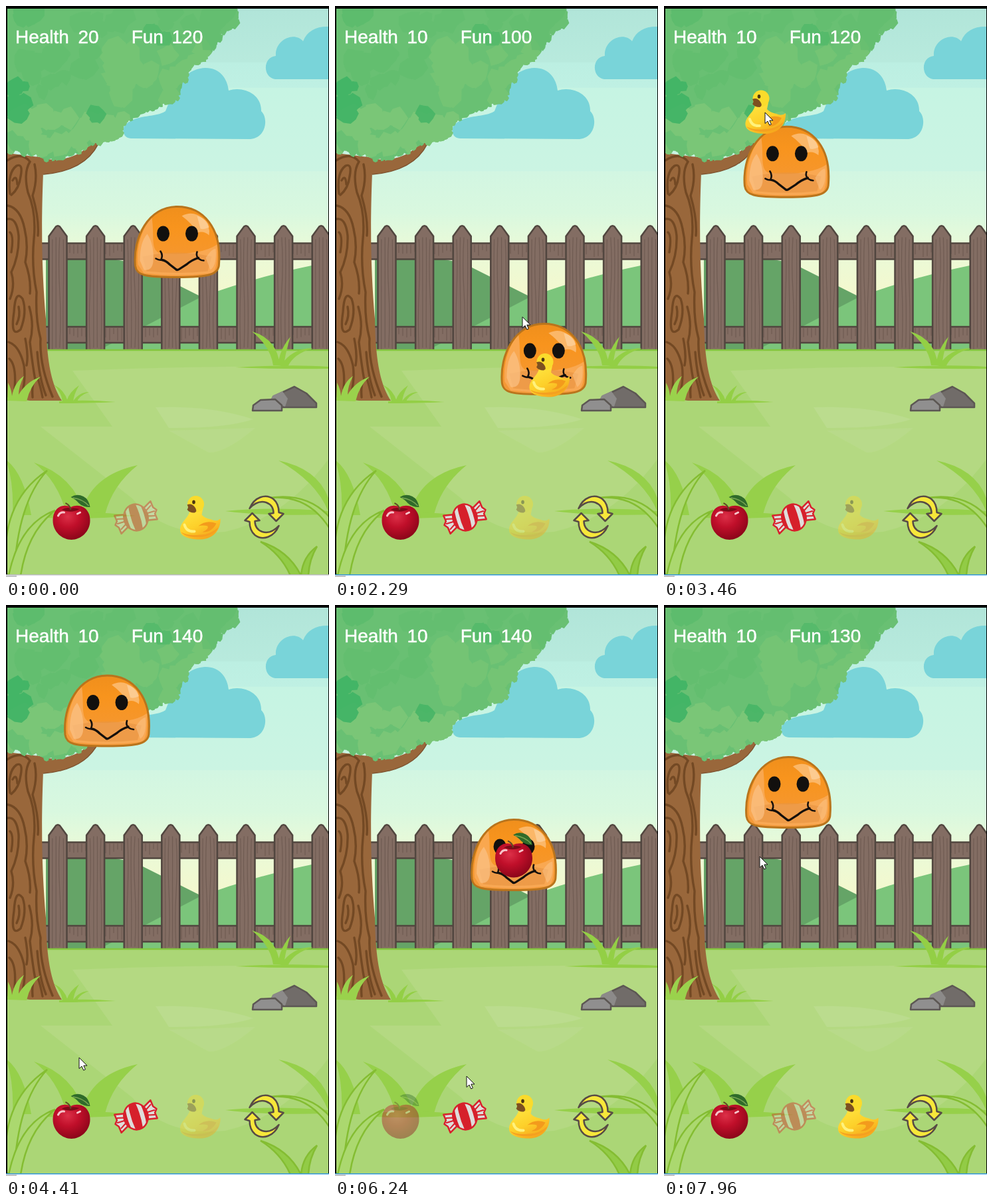
Animation of 486 by 858 pixels, one loop 8 s. Source, as an HTML page:

```html
<!DOCTYPE html>
<html lang="en">
<head>
<meta charset="utf-8">
<title>Garden pet</title>
<style>
  html, body { margin: 0; width: 100%; height: 100%; overflow: hidden; background: #000; }
  svg { display: block; width: 486px; height: 858px; }
  text { font: 28px "Liberation Sans", Arial, sans-serif; fill: #fff; stroke: #fff; stroke-width: .5px; }
</style>
</head>
<body>
<svg viewBox="0 0 486 858" xmlns="http://www.w3.org/2000/svg">
  <defs>
    <linearGradient id="sky" gradientUnits="userSpaceOnUse" x1="0" y1="4" x2="0" y2="516">
      <stop offset="0" stop-color="#b1e5d9"/>
      <stop offset=".155" stop-color="#b8eadd"/>
      <stop offset=".16" stop-color="#bcefe2"/>
      <stop offset=".231" stop-color="#bff0e3"/>
      <stop offset=".233" stop-color="#c6f4e3"/>
      <stop offset=".476" stop-color="#cbf4e3"/>
      <stop offset=".478" stop-color="#d2f6e2"/>
      <stop offset=".6" stop-color="#d9f8df"/>
      <stop offset=".69" stop-color="#e8fad9"/>
      <stop offset=".85" stop-color="#f5f8cd"/>
    </linearGradient>
    <linearGradient id="skin" x1="0" y1="0" x2="0" y2="1">
      <stop offset="0" stop-color="#f08f1c"/>
      <stop offset=".3" stop-color="#f8941d"/>
      <stop offset=".62" stop-color="#f6962a"/>
      <stop offset="1" stop-color="#f39a3c"/>
    </linearGradient>
    <radialGradient id="red" cx=".4" cy=".32" r=".7">
      <stop offset="0" stop-color="#dc3048"/>
      <stop offset=".45" stop-color="#c00f2a"/>
      <stop offset="1" stop-color="#8a0519"/>
    </radialGradient>
    <linearGradient id="yolk" x1="0" y1="0" x2=".6" y2="1">
      <stop offset="0" stop-color="#ffea45"/>
      <stop offset=".6" stop-color="#fdd02a"/>
      <stop offset="1" stop-color="#f6a71d"/>
    </linearGradient>
    <clipPath id="stage"><rect x="2" y="4" width="483" height="850"/></clipPath>
    <clipPath id="crown"><path id="crownClip"/></clipPath>
    <clipPath id="ball"><ellipse rx="18" ry="20"/></clipPath>

    <g id="apple">
      <path d="M-1-15C-11-21-28-16-28 5C-28 22-14 34 0 34C14 34 28 22 28 5C28-16 10-21-1-15Z" fill="url(#red)"/>
      <path d="M-15-11Q0-5 12-12Q3-15-1-13Q-7-16-15-11Z" fill="#7c0a18"/>
      <path d="M-1-11Q-2-18-9-21" fill="none" stroke="#5f4a26" stroke-width="2"/>
      <path d="M-1-30Q8-36 18-31Q26-27 28-15Q17-15 11-21Q6-27-1-30Z" fill="#2f6b2a"/>
      <path d="M2-29Q17-27 26-17" fill="none" stroke="#79a653" stroke-width="1.500"/>
      <path d="M-20-2Q-17-8-11-7M9-5L13-7" fill="none" stroke="#f6c3c9" stroke-width="3" stroke-linecap="round"/>
    </g>
    <g id="candy" transform="rotate(-17)" stroke="#d8202c" stroke-linejoin="round">
      <path d="M-15-9L-30-12L-29-3L-33 2L-29 7L-28 17L-15 10ZM15-10L28-17L29-7L33-2L29 3L30 12L15 9Z" fill="#dedcda" stroke-width="2.500"/>
      <path d="M-17-3L-28-6M-17 1H-30M-17 5L-27 11M17-5L27-11M17-1H30M17 3L28 6" stroke-width="2"/>
      <ellipse rx="18" ry="20" fill="#dfdddb" stroke="none"/>
      <g clip-path="url(#ball)" fill="#d6202b" stroke="none">
        <path d="M-20-20H-11Q-15 0-11 20H-20ZM-6-20H5Q8 0 5 20H-6Q-9 0-6-20ZM11-20H20V20H11Q15 0 11-20Z"/>
      </g>
      <ellipse rx="18" ry="20" fill="none" stroke-width="2.500"/>
    </g>
    <g id="duck">
      <path d="M-15-10C-16-1-26 5-29 14C-33 29-16 33 2 33C22 32 32 17 31 2Q25 7 17 3Q7 1 3-4L5-14Z" fill="url(#yolk)"/>
      <path d="M-28 22C-20 33 20 34 28 15Q14 27 0 26Q-18 28-28 22Z" fill="#f5a020"/>
      <path d="M-2 13Q10 3 25 9Q18 23 4 22Q14 18 12 13Q5 11-2 13Z" fill="#f39b1c"/>
      <path d="M-23 11Q-20 22-8 21" fill="none" stroke="#fff27c" stroke-width="4" stroke-linecap="round"/>
      <circle cx="-6" cy="-20" r="12.500" fill="#fadb2c"/>
      <path d="M-19-19Q-12-22-7-15Q-3-9-8-7Q-16-7-19-12Q-16-15-19-19Z" fill="#7d5020"/>
      <ellipse cx="-9" cy="-23" rx="2.300" ry="3" fill="#4a3512"/>
    </g>
    <path id="arrow" d="M-22-13C-15-30 2-36 14-27Q22-20 22-7L29-5L18 6L7-5L14-6Q14-18 3-22Q-10-26-22-13Z" fill="#f7e73a" stroke="#574b45" stroke-width="2.500" stroke-linejoin="round"/>
    <path id="dome" d="M-63 36C-67-7-43-53 0-53C40-53 67-20 63 33C63 49 48 53 0 53C-50 53-61 50-63 36Z"/>
  </defs>

  <rect width="486" height="858"/>
  <g clip-path="url(#stage)">
    <rect y="4" width="486" height="513" fill="url(#sky)"/>
    <g fill="#79d4d9">
      <path d="M188 199C174 198 174 182 181 177C200 162 225 168 240 158C252 128 266 94 300 93C322 93 333 109 335 127C355 120 385 131 384 158C395 168 392 198 368 200Z"/>
      <path d="M405 110C386 107 386 77 406 75C404 52 433 37 447 53C453 37 468 30 486 31V110Z"/>
    </g>
    <path d="M60 381H165Q190 385 206 393L294 437L240 517H60Z" fill="#65a467"/>
    <path d="M140 517L294 437Q390 402 486 385V517Z" fill="#7bc57b"/>
    <g id="fence" fill="#836d63" stroke="#51463f" stroke-width="2.500"></g>

    <rect y="516" width="486" height="340" fill="#abd676"/>
    <path d="M100 548Q300 540 486 542V680Q420 770 330 790Q240 800 190 740L52 632H160Z" fill="#b4d982"/>
    <path d="M225 603Q310 600 372 621Q330 635 245 634Z" fill="#bbdc8e"/>
    <path d="M245 638L375 634Q330 672 305 671Z" fill="#bbdc8e" opacity=".7"/>
    <path d="M2 517H486" stroke="#84c63f" stroke-width="2.500"/>

    <g fill="#93cf45">
      <path d="M345 543Q430 538 486 542V545Q410 546 345 543Z"/>
      <path d="M370 489Q408 500 412 540H402Q398 512 370 489ZM409 540Q412 515 428 497Q420 522 418 541ZM413 541Q430 514 462 514Q432 523 424 542Z"/>
      <path d="M80 594Q120 591 165 595Q120 597 80 597ZM72 569Q88 577 93 594H85Q83 580 72 569ZM91 594Q95 580 110 570Q102 583 101 595ZM100 595Q110 580 125 580Q110 585 106 596Z"/>
    </g>

    <path d="M2 221L57 228C52 330 54 400 60 470C61 530 67 567 84 593H36L2 588Z" fill="#99673b"/>
    <path d="M46 226C80 238 112 226 131 204L139 207C124 237 94 250 55 253Z" fill="#99673b"/>
    <path d="M56 253C94 250 124 237 139 207" fill="none" stroke="#7e5330" stroke-width="1.500"/>
    <g fill="none" stroke="#734924" stroke-width="3.400" stroke-linecap="round">
      <path d="M2 232Q24 218 36 234Q26 250 33 280Q46 310 42 350Q38 390 46 430Q44 470 52 500Q50 540 70 587"/>
      <path d="M6 282Q2 250 16 240Q26 236 22 256Q20 274 8 284M10 262Q16 252 17 268"/>
      <path d="M43 238Q48 260 40 285Q50 320 48 345M3 300Q22 304 28 335Q34 360 29 385Q38 410 36 432"/>
      <path d="M3 320Q16 318 19 345Q20 375 8 400Q14 420 6 440M6 340Q12 345 8 370"/>
      <path d="M25 440Q32 460 22 486Q6 500 12 460Q14 425 25 440ZM19 452Q22 466 16 478"/>
      <path d="M35 452Q43 480 36 505Q40 540 44 562M4 505Q20 510 27 540Q30 560 24 584M5 530Q16 540 13 575M29 500Q34 525 31 540"/>
      <path d="M47 520Q50 560 60 585M40 588Q38 560 48 560Q52 572 55 588"/>
    </g>
    <path fill="#9ad24c" d="M2 593L3 566Q8 575 9 586Q13 565 27 556Q19 572 19 584Q30 565 52 557Q36 571 31 594Z"/>
    <g id="tree"></g>

    <g stroke="#5c5753" stroke-width="2.500" stroke-linejoin="round">
      <path d="M397 603L402 587L434 572L452 582L467 597V603Z" fill="#716c69"/>
      <path d="M396 594L402 585L416 579L424 590L420 602Z" fill="#8c8a89" stroke="none"/>
      <path d="M371 608L372 600L383 592L405 591L415 600V608Z" fill="#908f8f"/>
    </g>

    <g fill="#96d04a">
      <path d="M0 682Q27 702 38 765H10Q12 715 0 682ZM42 686Q104 706 120 768H92Q80 715 42 686ZM112 766Q126 705 198 690Q158 722 148 768Z"/>
      <path d="M95 733Q110 748 108 770H97Q104 750 95 733ZM60 764Q110 756 195 766Q120 772 60 769Z"/>
      <path d="M410 683Q470 695 486 742V762Q468 715 410 683ZM330 759Q395 752 486 759V764Q390 767 330 759Z"/>
    </g>
    <g fill="#abd86f" stroke="#84bd32" stroke-width="2.500">
      <path d="M0 806Q6 735 62 698Q18 745 12 854H0Z"/>
      <path d="M4 856Q20 777 74 758Q32 790 22 856Z"/>
      <path d="M390 740Q455 730 490 790V772Q455 728 390 740Z"/>
      <path d="M428 856Q414 824 383 805Q425 818 444 856Z" fill="#92cb46"/>
      <path d="M444 856Q446 828 468 812Q456 832 455 856Z" fill="#92cb46"/>
    </g>

    <use id="barApple" href="#apple" x="98.500" y="768"/>
    <use id="barCandy" href="#candy" x="195.500" y="768.500"/>
    <use id="barDuck" href="#duck" x="291.500" y="768.500"/>
    <g transform="translate(388.500 768)">
      <use href="#arrow"/>
      <use href="#arrow" transform="rotate(180)"/>
    </g>

    <g id="pet">
      <use href="#dome" fill="url(#skin)"/>
      <path d="M-59 34C-62 4-50-26-38-36C-34-10-40 10-28 16Q0 21 30 15Q48 12 60 4Q62 46 50 47Q0 53-50 47Z" fill="#faad5c" opacity=".8"/>
      <path d="M-52 22Q0 10 52 22L46 44Q0 49-46 44Z" fill="#e99543" opacity=".65"/>
      <path d="M-56 28Q-56 0-45-12Q-34 5-36 30Q-38 44-50 42Z" fill="#fbc286" opacity=".7"/>
      <path d="M7-39Q24-48 39-35Q51-22 48-10Q40-17 31-14Q22-28 7-39Z" fill="#fbb768"/>
      <path d="M30-39Q45-35 48-22Q40-18 35-20Z" fill="#fcd09a" opacity=".8"/>
      <path d="M43 24Q52 10 58 10Q60 36 50 42Z" fill="#fbc286" opacity=".55"/>
      <use href="#dome" fill="none" stroke="#b9741c" stroke-width="3"/>
      <ellipse cx="-21" cy="-12.500" rx="9.500" ry="11.500" fill="#12100e"/>
      <ellipse cx="22" cy="-12.500" rx="9.500" ry="11.500" fill="#12100e"/>
      <path id="mouth" fill="#1a0e08"/>
      <path id="smile" fill="none" stroke="#15100c" stroke-width="3.300" stroke-linecap="round"/>
      <path d="M-32 25Q-27 28-23 27M-25 14Q-21 20-24 26M30 15Q28 21 32 25Q36 28 40 28" fill="none" stroke="#15100c" stroke-width="2.600" stroke-linecap="round"/>
    </g>
    <use id="item"/>
    <g>
      <text x="14" y="56">Health</text>
      <text x="108.500" y="56" id="health">20</text>
      <text x="188.700" y="56">Fun</text>
      <text x="249.500" y="56" id="fun">120</text>
    </g>
  </g>

  <rect y="854" width="486" height="4" fill="#fff"/>
  <rect id="edge" y="854" width="486" height="1.500"/>
  <rect y="855.500" width="16" height="2.500" fill="#c3c5c8"/>
  <path id="cursor" d="M0 0V16.500L4 13L6.700 19L9.400 17.800L6.800 12H12Z" fill="#fff" stroke="#111" stroke-width="1" stroke-linejoin="round"/>
</svg>

<script>
const $ = id => document.getElementById(id);
let seed = 11;
const rnd = () => (seed = seed * 16807 % 2147483647) / 2147483647;
const mix = (a, b, k) => a + (b - a) * k;

// Fence: two rails behind eight pointed posts, all with upright grain
const grain = d => `<path d="${d}" fill="none" stroke="#705c53" stroke-width="1.200"/>`;
let fence = '';
for (const y of [356.5, 482]) {
  fence += `<rect x="40" y="${y}" width="460" height="24"/>`;
  for (let x = 66; x < 486; x += 6) fence += grain(`M${x} ${y + 2}v${8 + rnd() * 11}`);
}
for (let i = 0; i < 8; i++) {
  const x = 78 + 56.6 * i;
  fence += `<path d="M${x - 13.5} 519V346L${x - 3} 331.500Q${x} 329 ${x + 3} 331.500L${x + 13.5} 346V519Z"/>`;
  for (let k = -1.5; k <= 1.5; k++) {
    fence += grain(`M${x + k * 5.5} ${346 + Math.abs(k) * 3}q${rnd() * 6 - 3} 40 0 80t0 86`);
  }
}
$('fence').innerHTML = fence;

// Tree crown: ragged edge plus painted patches
const rim = [[0, 2], [345, 2], [346, 22], [326, 40], [314, 54], [302, 72], [288, 84], [272, 90], [272, 106],
  [254, 124], [258, 138], [234, 148], [212, 156], [190, 167], [174, 182], [160, 199], [138, 204],
  [114, 217], [86, 228], [62, 230], [38, 220], [0, 216]];
const blob = (x, y, r) => {
  let d = '';
  for (let i = 0; i < 9; i++) {
    const a = i * Math.PI / 4.5, q = r * (.65 + rnd() * .5);
    d += `${i ? 'L' : 'M'}${(x + Math.cos(a) * q).toFixed(1)} ${(y + Math.sin(a) * q).toFixed(1)}`;
  }
  return d + 'Z';
};
let crown = 'M' + rim.join('L') + 'Z';
for (let i = 1; i < rim.length - 1; i++) {
  const [x1, y1] = rim[i], [x2, y2] = rim[i + 1];
  for (let k = 0; k < 1; k += .25) {
    crown += blob(mix(x1, x2, k) + rnd() * 6 - 4, mix(y1, y2, k) + rnd() * 6 - 4, 3 + rnd() * 6);
  }
}
$('crownClip').setAttribute('d', crown);
const patch = (n, x, y, w, h, r, fill, o) => {
  let d = '';
  for (let i = 0; i < n; i++) d += blob(x + rnd() * w, y + rnd() * h, r * (.6 + rnd() * .7));
  return `<path d="${d}" fill="${fill}" opacity="${o}"/>`;
};
$('tree').innerHTML = '<g clip-path="url(#crown)"><rect width="380" height="250" fill="#69c073"/>' +
  patch(26, 150, 60, 150, 80, 20, '#7ac676', .7) +
  patch(38, 0, 165, 190, 70, 17, '#7dc778', .9) +
  patch(16, 100, 4, 240, 45, 18, '#62bd6f', .6) +
  patch(14, 0, 60, 130, 70, 18, '#5fbc6d', .6) +
  patch(12, 0, 115, 28, 55, 14, '#40b465', .9) +
  patch(6, 212, 32, 36, 22, 12, '#52b96a', .8) +
  patch(4, 125, 148, 16, 20, 12, '#48b566', .9) +
  patch(5, 2, 4, 50, 20, 14, '#55ba6a', .6) + '</g>';

// Timeline
const LOOP = 8000, STEP = 73.1, WALK = 640, EAT = 662, FACE = 120;
const HOME = [257.5, 354.5];
const walks = [
  { at: 1725, item: 'duck', to: [322, 554.5] },
  { at: 2940, item: 'duck', to: [152, 159] },
  { at: 5577, item: 'apple', to: [269, 375.5] },
  { at: 7250, item: 'candy', to: [187, 281.5] }
];
const stats = [[0, 20, 120], [2250, 10, 100], [2387, 10, 120], [3602, 10, 140],
  [6239, 30, 140], [7150, 20, 120], [7912, 10, 130]];
const picks = [[0, 'Candy'], [1115, 'Duck'], [4765, 'Apple'], [6595, 'Candy']];
const pointer = [[0, 398, 862], [241, 398, 859], [315, 398, 852], [450, 397, 842], [720, 345, 712], [960, 285, 758],
  [1120, 285, 758], [1640, 322, 556], [1725, 322, 554], [1850, 317, 554], [2080, 317, 550],
  [2780, 153, 162], [2940, 152, 160], [3620, 152, 160], [3950, 190, 400], [4405, 110, 680],
  [4630, 108, 763], [4770, 108, 763], [5480, 270, 362], [5570, 269, 376], [5700, 269, 376],
  [6236, 198, 708], [6455, 198, 747], [6760, 198, 760], [7190, 187, 281], [7400, 187, 281], [7910, 144, 378], [8000, 144, 378]];
const last = (list, t) => list.filter(e => e[0] <= t).pop();

function pointerAt(t) {
  const i = Math.max(1, pointer.findIndex(p => p[0] > t));
  const [a, b] = [pointer[i - 1], pointer[i]];
  const k = (t - a[0]) / (b[0] - a[0]), s = k * k * (3 - 2 * k);
  return [mix(a[1], b[1], s), mix(a[2], b[2], s)];
}

const move = (el, [x, y]) => el.setAttribute('transform', `translate(${x.toFixed(1)} ${y.toFixed(1)})`);

const LIP = 'M-23 27Q-17 28-11 34L-2 41Q0 43 3 41L14 34Q22 27 32 24';
$('smile').setAttribute('d', LIP);

function draw(t) {
  const n = walks.filter(w => w.at <= t).length;
  const walk = walks[n - 1];
  let pos = HOME, open = 0;
  if (walk) {
    const from = n > 1 ? walks[n - 2].to : HOME;
    const k = Math.min(1, (t - walk.at) / WALK);
    pos = [mix(from[0], walk.to[0], k), mix(from[1], walk.to[1], k)];
    const since = t - walk.at - EAT;
    if (since >= 0) open = [0, .5, 1, .5, 0][Math.floor(since / FACE)] || 0;
  }
  move($('pet'), pos);
  $('mouth').setAttribute('d', open ? `${LIP}Q2 ${34 - 14 * open}-23 27Z` : '');

  const shown = walk && t < walk.at + EAT;
  $('item').style.display = shown ? '' : 'none';
  if (shown) {
    $('item').setAttribute('href', '#' + walk.item);
    move($('item'), walk.to);
  }

  const [, health, fun] = last(stats, t);
  $('health').textContent = health;
  $('fun').textContent = fun;
  const picked = last(picks, t)[1];
  for (const name of ['Apple', 'Candy', 'Duck']) $('bar' + name).style.opacity = name === picked ? .4 : 1;
  $('edge').setAttribute('fill', t < 1115 ? '#b9bbbd' : '#2f95d6');
  move($('cursor'), pointerAt(t));
}

const start = performance.now();
function tick() {
  const t = (performance.now() - start) % LOOP;
  // the picture refreshes at a low, even rate
  draw(Math.max(0, 1850 + Math.floor((t - 1850) / STEP) * STEP));
  requestAnimationFrame(tick);
}
tick();
</script>
</body>
</html>
```
